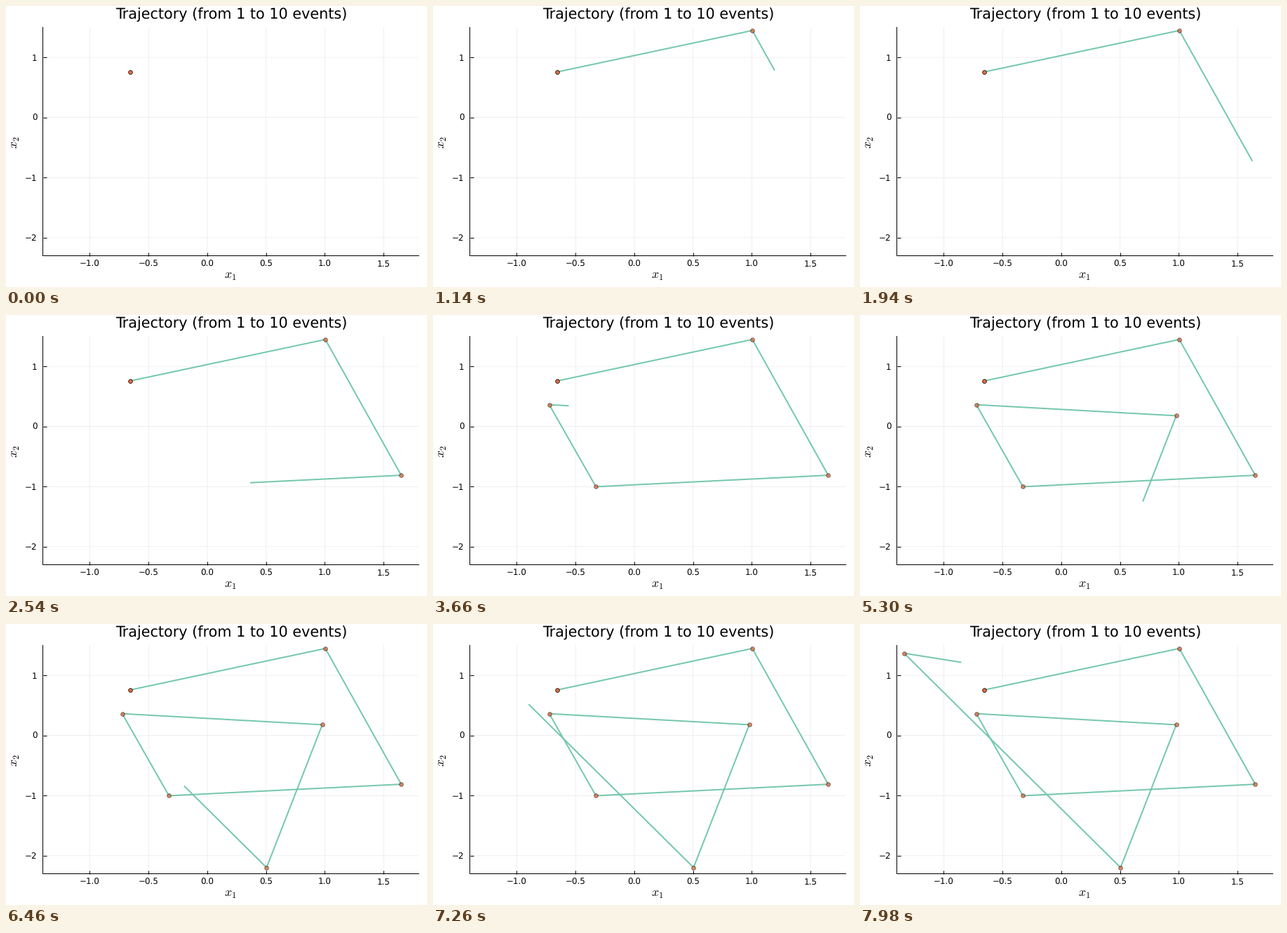
Recreate the animation shown at these times as a matplotlib script. Size 600 by 400 pixels, loop 8000 ms.

```python
import matplotlib.pyplot as plt
import numpy as np
from matplotlib.animation import FuncAnimation

plt.rcParams.update({
    "font.family": "DejaVu Sans",
    "mathtext.fontset": "cm",
    "axes.unicode_minus": True,
    "text.hinting": "none",
    "path.snap": False,
})

W, H = 600, 400
LEFT, RIGHT, TOP, BOTTOM = 52.5, 588.4, 30.4, 355.5
TICK_MS = 20
TICKS = 400

# Event positions, and the step at which the particle reaches each one
X = np.array([-0.657, 1.004, 1.650, -0.327, -0.724, 0.978, 0.504, -1.338, -0.851])
Y = np.array([0.758, 1.448, -0.811, -1.002, 0.363, 0.179, -2.197, 1.369, 1.217])
REACHED = np.array([0, 17.97, 41.9, 62.05, 76.95, 97.95, 123.0, 165.0, 171.0])
EVENTS = len(X) - 1

fig = plt.figure(figsize=(W / 72, H / 72), dpi=72, facecolor="white")
ax = fig.add_axes([LEFT / W, 1 - BOTTOM / H, (RIGHT - LEFT) / W, (BOTTOM - TOP) / H])
ax.set(xlim=(-1.4, 1.8), ylim=(-2.3, 1.5))
ax.set_xticks(np.arange(-1, 1.6, 0.5))
ax.set_yticks([-2, -1, 0, 1])
ax.set_axisbelow(True)
ax.grid(color="black", alpha=0.1, linewidth=0.6)
ax.tick_params(direction="in", length=5, width=1, labelsize=11.85)
ax.tick_params(axis="x", pad=6.7)
ax.tick_params(axis="y", pad=8)
ax.spines[["top", "right"]].set_visible(False)
for side in ("left", "bottom"):
    ax.spines[side].set_linewidth(1)


def label(x, y, text, size, **kw):
    fig.text(x / W, 1 - y / H, text, size=size, ha="center", **kw)


label(320.8, 18.8, "Trajectory (from 1 to 10 events)", 20.74, va="baseline")
label(319.6, 386.7, "$x_1$", 17.8, va="baseline")
label(12.4, 194.3, "$x_2$", 17.8, va="center", rotation=90)

path, = ax.plot([], [], color="#66c2a5", alpha=0.9, linewidth=2,
                solid_capstyle="butt", solid_joinstyle="miter", zorder=3)


def dots(z):
    return ax.scatter(X[:1], Y[:1], s=5.6 ** 2, linewidths=0.9, zorder=z,
                      facecolors=[(0.89, 0.38, 0.20, 0.7)],
                      edgecolors=[(0, 0, 0, 0.55)])


start, events = dots(4), dots(5)


def step_at(tick):
    """Steps are held for 1, 5 and 1 ticks in turn."""
    cycle, phase = divmod(tick, 7)
    return 3 * cycle + (phase >= 1) + (phase >= 6)


def update(tick):
    step = step_at(tick)
    seen = min(int(np.searchsorted(REACHED, step, side="right")), EVENTS)
    head_x = np.interp(step, REACHED, X)
    head_y = np.interp(step, REACHED, Y)
    path.set_data(np.append(X[:seen], head_x), np.append(Y[:seen], head_y))
    events.set_offsets(np.column_stack([X[:seen], Y[:seen]]))
    return path, events


anim = FuncAnimation(fig, update, frames=TICKS, interval=TICK_MS,
                     repeat=True, repeat_delay=0, blit=False)
plt.show()
```
